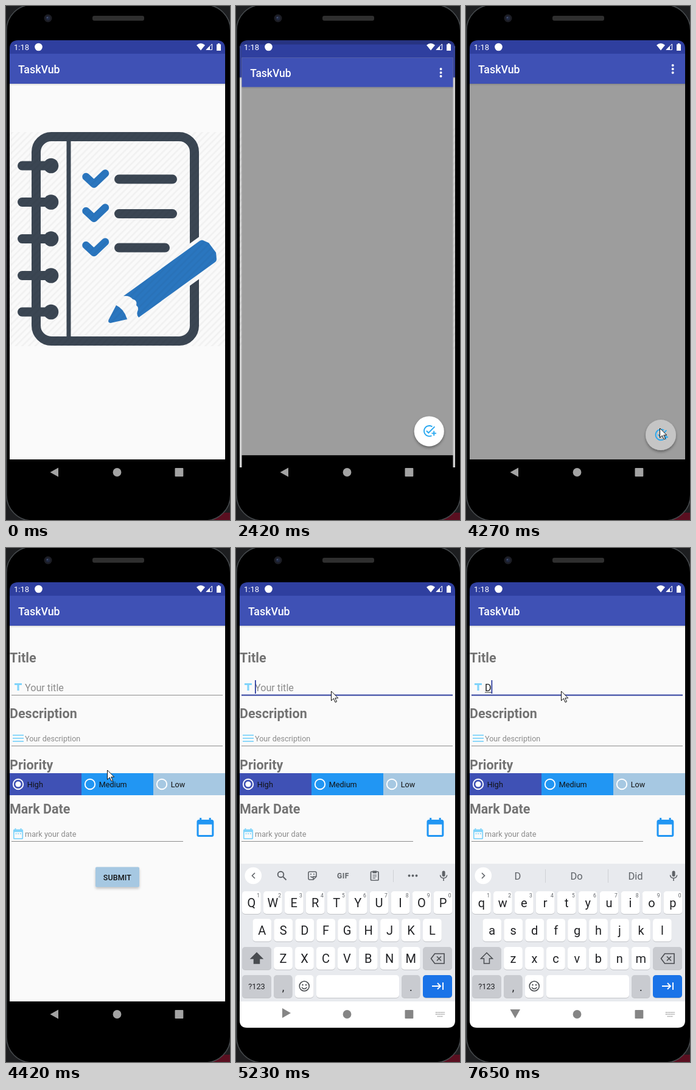
An HTML page for the animation above (8000 ms loop, 368x840 px).

```html
<!DOCTYPE html>
<html lang="en">
<head>
<meta charset="utf-8">
<style>
html, body { margin: 0; width: 368px; height: 840px; overflow: hidden; background: #000; }
svg { display: block; font-family: Roboto, sans-serif; }
</style>
</head>
<body>
<svg id="stage" width="368" height="840" viewBox="0 0 368 840"></svg>
<script>
const LOOP = 8000;
const INDIGO = '#3f51b5', DEEP = '#2f3f9f', SLATE = '#3b4653', BLUE = '#2a76bf';
const SKY = '#2196f3', PALE = '#a6c8e2', LIGHT = '#81d4fa', PAGE = '#fafafa', GRAY = '#5f6368';

const rect = (x, y, w, h, fill, r = 0, more = '') =>
  `<rect x="${x}" y="${y}" width="${w}" height="${h}" rx="${r}" fill="${fill}" ${more}/>`;
const circle = (x, y, r, fill, more = '') => `<circle cx="${x}" cy="${y}" r="${r}" fill="${fill}" ${more}/>`;
const shape = (d, fill, more = '') => `<path d="${d}" fill="${fill}" ${more}/>`;
const line = (d, color, width = 1.6, more = '') =>
  shape(d, 'none', `stroke="${color}" stroke-width="${width}" ${more}`);
const text = (x, y, size, fill, str, more = '') =>
  `<text x="${x}" y="${y}" font-size="${size}" fill="${fill}" ${more}>${str}</text>`;
const group = (content, more = '') => `<g ${more}>${content}</g>`;
const each = (list, fn) => [...list].map(fn).join('');
const MID = 'text-anchor="middle"', BOLD = 'font-weight="700"', MEDIUM = 'font-weight="500"';
const ROUND = 'stroke-linecap="round" stroke-linejoin="round"';
const SHADOW = 'filter="url(#shadow)"';

// Value of the latest [time, value] entry that has begun.
const stepAt = (t, steps) => steps.reduce((v, [at, next]) => t >= at ? next : v, null);
// Scale about the middle of the app window.
const zoom = s => `transform="translate(183 398.5) scale(${s}) translate(-183 -398.5)"`;

const DEFS = `<defs>
  <clipPath id="screen"><path d="M6 70Q6 56 20 56H346Q360 56 360 70V772Q360 784 348 784H18Q6 784 6 772Z"/></clipPath>
  <pattern id="stripes" width="7.6" height="7.6" patternUnits="userSpaceOnUse" patternTransform="rotate(45)">
    <rect width="2.6" height="7.6" fill="#000" opacity=".035"/></pattern>
  <filter id="shadow" x="-30%" y="-30%" width="160%" height="180%">
    <feDropShadow dx="0" dy="2.5" stdDeviation="2" flood-opacity=".38"/></filter>
</defs>`;

const device =
  rect(0, 0, 368, 840, '#1d1e20') + rect(338, 828, 30, 12, '#5a0f20') +
  rect(.8, -2, 368, 843, '#000', 42, 'stroke="#45494c" stroke-width="1.6"') +
  circle(69, 20, 6.5, '#1c1d24') + circle(69, 20, 3.4, '#20283f') + circle(68, 19, 1.3, '#42506f') +
  rect(142, 16, 85, 8, '#2f2f2f', 3);

const statusIcons =
  text(13, 71.5, 13, '#fff', '1:18') + circle(53.5, 67, 6.3, '#fff') +
  shape('M313 64Q320 58 327 64L320 72.5Z', '#fff') +
  line('M329 71.5H338.5V62Z', '#fff', 1) + shape('M328.5 72L335 65.5V72Z', '#fff') +
  shape('M346 62.5H348V61H351V62.5H353V73H346Z', '#fff');

const bar = body =>
  rect(6, 56, 354, 22, DEEP) + rect(6, 78, 354, 685 - 22, body) +
  rect(6, 127, 354, 1, '#000', 0, 'opacity=".16"') + rect(6, 128, 354, 2, '#000', 0, 'opacity=".05"') +
  rect(6, 78, 354, 49, INDIGO) + text(20, 110, 17.8, '#fff', 'TaskVub', MEDIUM);

const notebook =
  rect(49.5, 213.5, 260, 334, 'none', 25, `stroke="${SLATE}" stroke-width="15"`) +
  rect(99.5, 214, 7, 334, SLATE) +
  each([261, 320.5, 380.5, 440.5, 500], y => rect(19, y - 7.5, 58, 15, SLATE, 7.5) + circle(74, y, 12.3, SLATE)) +
  each([[283, 281], [339.5, 281], [395, 269]], ([y, end], i) =>
    rect(178, y - 7.5, end - 178, 15, SLATE, 7.5) +
    line(`M131.5 ${279 + i * 56}L144.5 ${291 + i * 56}L163 ${273.5 + i * 56}`, BLUE, 12.5, ROUND)) +
  shape('M298 391L319 376V445L298 460Z', PAGE) +
  shape('M193 474L318 384Q322 381 326 384L333 387L345 403L346 414Q346 417 343 419L218 509' +
    'Q214 505 216 499Q219 493 214 489Q216 481 208 479Q203 473 193 474Z', BLUE) +
  shape('M181 489Q194 495 199 512L172 518Q167 518 168.5 513Z', BLUE);

const splash = bar(PAGE) + notebook + rect(6, 206, 354, 350, 'url(#stripes)');

const ADD_TASK = 'M22 5.18L10.59 16.6l-4.24-4.24 1.41-1.41 2.83 2.83 10-10zM12 20c-4.41 0-8-3.59-8-8s3.59-8 8-8' +
  'c1.57 0 3.04.46 4.28 1.25l1.45-1.45C16.1 2.67 14.13 2 12 2 6.48 2 2 6.48 2 12s4.48 10 10 10' +
  'c1.73 0 3.36-.44 4.78-1.22l-1.5-1.5c-1 .46-2.11.72-3.28.72zm7-5h-3v2h3v3h2v-3h3v-2h-3v-3h-2z';

const listScreen = pressed =>
  bar('#9d9d9d') + rect(6, 741, 354, 43, '#000') +
  each([97, 103, 109], y => circle(339.7, y, 2, '#fff')) +
  circle(320, 701, 25, pressed ? '#c5c5c5' : '#fff', SHADOW) +
  shape(ADD_TASK, '#29a8f0', 'transform="translate(308.7 689) scale(.97)"');

const CALENDAR = 'M19 4h-1V2h-2v2H8V2H6v2H5C3.9 4 3 4.9 3 6v14c0 1.1.9 2 2 2h14c1.1 0 2-.9 2-2V6c0-1.1-.9-2-2-2z' +
  'm0 16H5V9h14z';

function form({ focused, typed, caret, composing }) {
  const heading = (y, str) => text(6, y, 21.5, '#737373', str, BOLD);
  const hint = (y, size, str) => text(31, y, size, '#8b8b8b', str);
  const rule = (y, w) => rect(9, y, w, 1, '#8d8d8d');
  return bar(PAGE) +
    heading(187, 'Title') + heading(278, 'Description') + heading(362, 'Priority') + heading(434, 'Mark Date') +
    shape('M14 221H26V224H21.6V233H18.4V224H14Z', LIGHT) +
    (typed ? text(31, 234, 16.2, '#222', 'D') : hint(234, 16.2, 'Your title')) +
    (composing ? rect(31, 235.5, 11, 1, '#333') : '') +
    (focused ? rect(9, 239.5, 347, 2, DEEP) : rule(240, 347)) +
    (caret ? rect(typed ? 41.5 : 31, 216, 1.8, 22, DEEP) : '') +
    each([305, 310, 315], y => rect(11, y, 18, 1.8, LIGHT)) +
    hint(316, 12.6, 'Your description') + rule(323, 347) +
    each([['High', INDIGO], ['Medium', SKY], ['Low', PALE]], ([label, fill], i) =>
      rect(6 + i * 118, 368, 118, 36, fill) +
      circle(20 + i * 118, 386, 8.2, 'none', 'stroke="#fff" stroke-width="1.9"') +
      text(34.8 + i * 118, 390.5, 12.6, '#111', label)) +
    circle(20, 386, 4.6, '#fff') +
    shape(CALENDAR, LIGHT, 'transform="translate(9.2 456.2) scale(.9)"') +
    each([16.3, 19.9, 23.5], x => rect(x - .6, 466, 1.8, 1.8, LIGHT)) +
    hint(471.5, 12.7, 'mark your date') + rule(479, 282) +
    shape(CALENDAR, SKY, 'transform="translate(308.8 437.9) scale(1.55)"') +
    rect(147, 521.5, 72, 32.5, PALE, 2, 'filter="url(#shadow)" opacity=".6"') + rect(147, 521.5, 72, 32.5, PALE, 2) +
    text(182.8, 542.5, 12.5, '#111', 'SUBMIT', MID + MEDIUM + ' letter-spacing=".1"');
}

const tools =
  line('M31 531L26.5 535.5L31 540', GRAY) +
  circle(73.5, 533.5, 4.8, 'none', `stroke="${GRAY}" stroke-width="1.9"`) + line('M77 537L82.5 542.5', GRAY, 2) +
  line('M121 529H130Q132 529 132 531V537L127 542H121Q119 542 119 540V531Q119 529 121 529ZM127 542V537H132' +
    'M122.5 536.5Q124.5 539 126.5 537.5', GRAY) +
  circle(123, 533, 1, GRAY) + circle(128, 533, 1, GRAY) +
  text(176, 539.5, 12, GRAY, 'GIF', MID + BOLD + ' letter-spacing=".6"') +
  rect(221.5, 529, 12.5, 14, 'none', 1, `stroke="${GRAY}" stroke-width="1.7"`) + rect(224.5, 527.5, 6.5, 4, GRAY) +
  line('M224.5 534.5H231M224.5 537H231M224.5 539.5H229', GRAY, 1.2) +
  rect(258, 526, 1, 20, '#cfd1d5') + each([284.5, 290.5, 296.5], x => circle(x, 535.5, 1.9, GRAY));

const suggestions =
  line('M26 531L30.5 535.5L26 540', GRAY) +
  each([['D', 85], ['Do', 181.5], ['Did', 278.5]], ([word, x]) => text(x, 542, 16.5, GRAY, word, MID)) +
  rect(130, 525, 1, 22, '#cfd1d5') + rect(233, 525, 1, 22, '#cfd1d5');

function keyboard({ typed, composing }) {
  const key = (x, y, w, fill = '#fff') => rect(x, y + 1, w, 37, '#c3c5c9', 5) + rect(x, y, w, 37, fill, 5);
  const INK = '#202124', SIDE = '#c9cbd0';
  const letters = (row, x0, y) => each(row, (ch, i) => {
    const x = x0 + i * 34.95;
    return key(x - 15.4, y, 30.8) + text(x, y + 26, 20, INK, typed ? ch.toLowerCase() : ch, MID);
  });
  return rect(6, 516, 354, 226, '#e8eaee') + circle(28.3, 535.5, 13.8, '#fff') +
    (composing ? suggestions : tools) +
    rect(338.6, 527.5, 5, 9.5, GRAY, 2.5) + line('M335.5 534.5Q336 539.5 341 539.5T346.7 534.5M341 539.5V544', GRAY) +
    letters('QWERTYUIOP', 25.4, 561) +
    each('1234567890', (n, i) => text(36.6 + i * 34.95, 570.5, 8.5, GRAY, n, MID)) +
    letters('ASDFGHJKL', 42.8, 606) + letters('ZXCVBNM', 77.5, 652) +
    key(10, 652, 48, SIDE) + key(307, 652, 48, SIDE) +
    shape('M34 661.5L43.5 671H38.5V679H29.5V671H24.5Z', typed ? 'none' : '#494c50', 'stroke="#494c50" stroke-width="1.5"') +
    line('M320.5 671L326.5 663H342V679H326.5ZM330 667.5L337 674.5M337 667.5L330 674.5', '#494c50') +
    key(10, 698, 48, SIDE) + text(34, 721, 12.8, INK, '?123', MID) +
    key(62, 698, 30.5, SIDE) + text(77.5, 724, 18, INK, ',', MID) +
    key(97, 698, 30.5) + circle(112.2, 716, 8, 'none', 'stroke="#494c50" stroke-width="1.6"') +
    circle(109.5, 714, 1.2, '#494c50') + circle(115, 714, 1.2, '#494c50') + line('M108 718Q112.2 723 116.4 718', '#494c50') +
    key(132, 698, 136) + key(272, 698, 30.5, SIDE) + text(287.3, 724, 18, INK, '.', MID) +
    key(307, 698, 48, '#1a73e8') + line('M322 716H336M331 711L336 716L331 721M340 710V722', '#fff', 1.9);
}

function navigation(t, white) {
  const fill = white ? '#858585' : '#a3a3a3';
  const back = t < 5230 ? 'M72.5 762L86 754.5V769.5Z' : t < 5350 ? 'M76 752V768L90 760Z' : 'M72.5 754H89L80.8 768.5Z';
  return (white ? rect(6, 741, 354, 43, '#fff') : '') +
    shape(back, fill) + circle(182.5, 762, 6.9, fill) + rect(277.5, 755, 13.8, 14, fill, 1) +
    (white ? line('M328 759H343M328 762H343M331 765.5H340', '#999', 1.7, 'stroke-dasharray="1.8 1"') : '');
}

function pointer(t) {
  const at = stepAt(t, [[3610, [349, 566]], [3730, [338, 632]], [3850, [330, 682]], [3970, [325, 697]],
    [4120, [318.5, 690]], [4420, [166.5, 363]], [4570, [156.5, 253]], [4720, [156.5, 234]]]);
  return at ? shape('M0 0V15.5L3.8 12L6.6 18.2L9 17.1L6.2 11.2H11.2Z', '#fff',
    `stroke="#111" stroke-width="1" transform="translate(${at})"`) : '';
}

function app(t) {
  if (t < 2420) return splash;
  if (t < 4420) {
    const back = stepAt(t, [[2420, 1.038], [2570, 1.045]]);
    const front = stepAt(t, [[2420, .98], [2570, .996], [2700, 1]]);
    const behind = t < 2700 ? group(splash, zoom(back)) + rect(6, 56, 354, 701, '#000', 0, 'opacity=".18"') : '';
    return behind + group(listScreen(t >= 4270), zoom(front));
  }
  const state = {
    focused: t >= 4840,
    typed: t >= 7370,
    composing: t >= 7650,
    caret: stepAt(t, [[4960, 1], [5490, 0], [5920, 1], [6480, 0], [6940, 1]])
  };
  const slide = t < 5230 ? 70 : 0;
  return form(state) + (t >= 5110 ? group(keyboard(state), `transform="translate(0 ${slide})"`) : '');
}

const stage = document.getElementById('stage');
let shown = '';
function tick() {
  const t = performance.now() % LOOP;
  const picture = DEFS + device +
    group(app(t) + navigation(t, t >= 5110) + statusIcons, 'clip-path="url(#screen)"') + pointer(t);
  if (picture !== shown) stage.innerHTML = shown = picture;
  requestAnimationFrame(tick);
}
tick();
</script>
</body>
</html>
```
